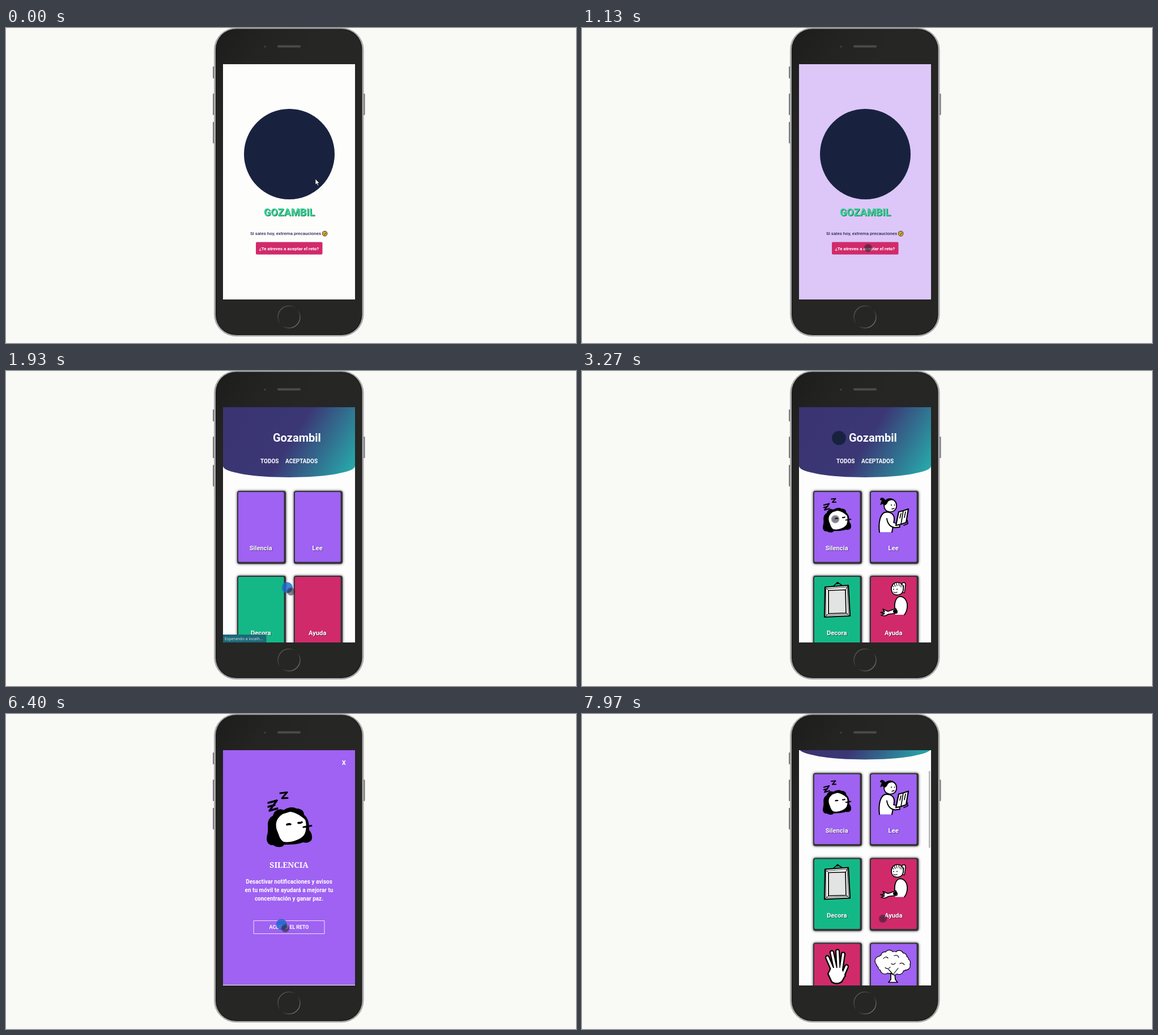
Recreate the animation shown at these times as an HTML page with a canvas. Size 1006 by 557 pixels, loop 8 s.

```html
<!DOCTYPE html>
<html lang="es">
<head>
<meta charset="utf-8">
<title>Gozambil</title>
<style>
html, body { margin: 0; width: 100%; height: 100%; overflow: hidden; background: #f9faf6; }
canvas { display: block; width: 1006px; height: 557px; }
</style>
</head>
<body>
<canvas id="stage"></canvas>
<script>
const W = 1006, H = 557, LOOP = 8000;
const canvas = document.getElementById('stage');
const ctx = canvas.getContext('2d');
const ratio = window.devicePixelRatio || 1;
canvas.width = W * ratio;
canvas.height = H * ratio;

const PURPLE = '#9f62f2', GREEN = '#14b886', PINK = '#d12a6b', NAVY = '#18223f';
const SCREEN = { x: 383, y: 64, w: 233, h: 416 };
const MID = 499.5;
const SCROLL = 107.5;

// Times in ms at which the pages and the cursor change
const T = {
  arrowEnd: 120, list: 1720, images: 2300, detail: 3800,
  idle: 4450, statusEnd: 4600, wait: 6400, back: 6630, drag: 7300, dragEnd: 7970
};

// Pointer stops: time, x, y
const STOPS = [
  [0, 546, 267], [830, 505, 389], [1700, 505, 389], [1930, 503, 390],
  [2530, 503, 390], [3270, 447, 262], [3850, 447, 262], [4330, 444, 331],
  [4570, 444, 331], [5130, 470, 360], [5530, 470, 360], [6100, 493, 379],
  [6630, 493, 379], [6970, 531, 469.5], [T.drag, 531, 469.5], [T.dragEnd, 531, 362]
];

const clamp = v => Math.max(0, Math.min(1, v));
const smooth = v => v * v * (3 - 2 * v);
const mix = (a, b, p) => a + (b - a) * p;
const span = (t, from, to) => smooth(clamp((t - from) / (to - from)));

function pointerAt(t) {
  let i = 0;
  while (i < STOPS.length - 2 && t >= STOPS[i + 1][0]) i++;
  const a = STOPS[i], b = STOPS[i + 1], p = span(t, a[0], b[0]);
  return { x: mix(a[1], b[1], p), y: mix(a[2], b[2], p) };
}

function box(x, y, w, h, r, fill) {
  ctx.beginPath();
  ctx.roundRect(x, y, w, h, r);
  ctx.fillStyle = fill;
  ctx.fill();
}

function disc(x, y, r, fill, ry = r) {
  ctx.beginPath();
  ctx.ellipse(x, y, r, ry, 0, 0, 7);
  ctx.fillStyle = fill;
  ctx.fill();
}

function shape(d, fill, line, width = 2) {
  const path = new Path2D(d);
  ctx.lineCap = ctx.lineJoin = 'round';
  if (fill) { ctx.fillStyle = fill; ctx.fill(path); }
  if (line) { ctx.strokeStyle = line; ctx.lineWidth = width; ctx.stroke(path); }
}

const ink = (d, width) => shape(d, null, '#000', width);

function label(str, x, y, size, opt = {}) {
  const { color = '#fff', align = 'center', weight = 700, family = 'Roboto, sans-serif', shadow } = opt;
  ctx.font = `${weight} ${size}px ${family}`;
  ctx.textAlign = align;
  if (shadow) {
    ctx.fillStyle = shadow;
    ctx.fillText(str, x + 1, y + 1);
  }
  ctx.fillStyle = color;
  ctx.fillText(str, x, y);
}

function phone() {
  [[365, 68, 21], [365, 116, 38], [365, 166, 38], [630, 116, 38]]
    .forEach(([x, y, h]) => box(x, y, 3.5, h, 1, '#77797a'));
  box(367, -0.5, 264.5, 546, 39, '#a9aaa9');
  box(370, 1.5, 258.5, 541.5, 36, '#1b1c1b');
  const body = ctx.createLinearGradient(371, 0, 500, 90);
  body.addColorStop(0, '#1c1c1b');
  body.addColorStop(0.5, '#232322');
  body.addColorStop(1, '#262625');
  box(371.5, 3, 255.5, 538.5, 35, body);
  box(479, 30.5, 41, 4, 2, '#4b4b4a');
  disc(457, 33, 2, '#3b3b3c');

  const ring = ctx.createLinearGradient(485, 497, 514, 525);
  ring.addColorStop(0, '#5a5a59');
  ring.addColorStop(0.45, '#252524');
  ring.addColorStop(0.55, '#252524');
  ring.addColorStop(1, '#70706f');
  ctx.beginPath();
  ctx.arc(MID, 511, 19.5, 0, 7);
  ctx.strokeStyle = ring;
  ctx.lineWidth = 1.5;
  ctx.stroke();
}

function wink(x, y) {
  disc(x, y, 4.8, '#33290f');
  disc(x, y, 3.9, '#e9b938');
  disc(x - 1.5, y - 1, 0.7, '#33290f');
  ink(`M${x + 0.7} ${y - 1}h1.6M${x - 1.7} ${y + 1.5}q2 1.3 3.4 -0.5`, 0.8);
}

function splash(t) {
  const p = clamp(0.35 * t / 1130);
  const tone = [[253, 159], [253, 98], [252, 242]].map(([a, b]) => Math.round(mix(a, b, p)));
  ctx.fillStyle = `rgb(${tone})`;
  ctx.fillRect(SCREEN.x, SCREEN.y, SCREEN.w, SCREEN.h);
  disc(500, 223, 80, NAVY);
  label('GOZAMBIL', 500, 332, 18, { color: '#3dd297', shadow: '#157a55' });
  label('Si sales hoy, extrema precauciones', 431, 366.3, 8, { color: '#2d2755', align: 'left', weight: 500 });
  wink(562.6, 363.6);
  box(441, 378.5, 117.5, 22, 2, PINK);
  label('¿Te atreves a aceptar el reto?', MID, 392.7, 8);
}

function sleeper() {
  shape('M471 180C474 168 484 167 490 170C498 164 508 164 512 167C522 167 526 172 526 178C535 186 535 196 535 205' +
    'C542 213 541 223 537 225C532 229 526 227 524 227C516 230 508 231 491 231C488 237 476 236 472 232' +
    'C462 233 458 224 461 214C463 206 462 202 462 196C462 188 466 182 471 180Z', '#000');
  shape('M478 205C474 190 480 183 488 177L501 173C508 173 520 179 528 187C531 195 530 208 526 214' +
    'C518 224 500 228 490 226C483 222 482 214 478 205Z', '#fff');
  ink('M496 195.5Q500 194 502 195M516 192.5Q519 193 522 191.5', 3.6);
  ink('M525 200L539 197.5M531 202L533 200', 3);
  ink('M463 157Q471 155 478 153L465 171L479 167M463 164L474 161', 3.4);
  ink('M484 140L496 138.5L487 149L497 148.5', 3);
}

function smallSleeper() {
  ctx.save();
  ctx.translate(425, 242);
  ctx.scale(0.625, 0.62);
  ctx.translate(-460, -165);
  sleeper();
  ctx.restore();
}

function reader() {
  shape('M525 285C523 268 526 254 534 250C544 248 552 253 551 263C550 272 548 279 547 285', '#fff', '#000', 2);
  shape('M538 261Q540 275 552 277L561 276L560 271L550 268', '#fff', '#000', 1.8);
  shape('M533 237C534 224 553 223 555 236C556 246 549 250 542 249C536 248 533 243 533 237Z', '#fff', '#000', 1.8);
  shape('M533 238C531 224 547 222 552 229Q544 227 540 231Q538 237 533 238Z', '#000');
  shape('M536 229C532 222 526 223 526 228L529 229L526 237L531 235L533 238Z', '#000');
  disc(546, 237, 1, '#000');
  disc(551.5, 237, 0.9, '#000');
  ink('M547 244L551 243', 1.3);
  shape('M559 249L567 247L576 244L572 268L563 271L554 273Z', '#fff', '#000', 2.2);
  ink('M567 247L563 271M571 249L569 259M563 252L561 260', 1.6);
  ink('M568 273L575 270L574 264', 1.8);
}

function painting() {
  ink('M444 380L451 374L459 379', 1.6);
  disc(451, 375, 2, '#000');
  shape('M429 382L470 379L473 433L428 435Z', '#fff', '#000', 2.2);
  ink('M431 385L468 382L470 430L431 432Z', 0.8);
  ink('M429 382L435 388M470 379L465 387M473 433L466 428M428 435L435 429', 1);
  shape('M435 388L465 387L466 428L435 429Z', '#e2e4e3', '#000', 1.7);
}

function helper() {
  shape('M553 431C550 415 552 403 560 399C570 398 575 408 574 418C573 426 570 430 568 431Z', '#fff');
  ink('M553 424C550 413 553 401 560 399C570 398 575 408 574 418Q573 426 569 431', 1.8);
  shape('M556 428L541 430L535 433L528 432L534 429L527 427L534 426L531 421L540 425L554 420Z', '#fff', '#000', 1.6);
  disc(553, 425, 4, '#000', 3.2);
  shape('M564 376Q571 371 571 379L569 392Q565 393 566 385Z', '#fff', '#000', 1.5);
  shape('M546 385C546 371 565 370 567 382C568 392 563 396 556 396C549 396 546 391 546 385Z', '#fff', '#000', 1.6);
  ink('M548 379L550 382M551 376L553 381M555 375L556 380M559 375L560 380M563 377L563 382M568 379L567 388', 1.1);
  disc(550, 386, 0.9, '#000');
  disc(556, 386, 0.9, '#000');
  ink('M550 391Q553 393 556 391', 1.2);
}

function hand() {
  const fingers = 'M446 568L433 538M449 566L441 529M453 566L451 527M456 567L461 532M457 577L467 554';
  const palm = 'M441 557L457 557L463 570L457 580Q449 585 442 580L436 567Z';
  ink(fingers, 8.5);
  shape(palm, '#000', '#000', 6);
  shape(fingers, null, '#fff', 3.8);
  shape(palm, '#fff', '#fff', 1);
}

function tree() {
  shape('M545 567L545 577L541 582H557L553 577L552 567L558 562H538Z', '#fff', '#000', 1.7);
  const crown = [];
  for (let i = 0; i < 17; i++) {
    const a = i * Math.PI * 2 / 17;
    crown.push([549 + 24 * Math.cos(a), 547 + 15 * Math.sin(a), 6 + 1.8 * Math.sin(i * 2.3)]);
  }
  crown.forEach(([x, y, r]) => disc(x, y, r + 1.2, '#000'));
  crown.forEach(([x, y, r]) => disc(x, y, r, '#fff'));
  disc(549, 547, 23, '#fff', 14.5);
  ink('M532 540q4 -5 8 -1M551 535q6 -3 8 3M561 549q5 -3 8 2M535 556q5 4 9 -1M549 568L541 559M550 567L558 557M546 549q4 3 7 -1', 1.2);
}

const CARDS = [
  ['Silencia', PURPLE, smallSleeper], ['Lee', PURPLE, reader],
  ['Decora', GREEN, painting], ['Ayuda', PINK, helper],
  ['', PINK, hand], ['', PURPLE, tree]
];

function card([name, color, draw], i, images) {
  const x = 410 + (i % 2) * 100, y = 214 + Math.floor(i / 2) * 150;
  ctx.save();
  ctx.shadowColor = '#2b2b2e';
  ctx.shadowBlur = 4 * ratio;
  box(x - 2, y - 2, 86, 129, 4, '#343437');
  ctx.restore();
  box(x, y, 80.5, 123.5, 2, color);
  if (images) draw();
  if (name) label(name, x + 39.7, y + 103, 11.2, { shadow: 'rgba(30,20,40,.55)' });
}

function header(images) {
  const g = ctx.createLinearGradient(425, 55, 615, 170);
  g.addColorStop(0, '#3a3472');
  g.addColorStop(0.46, '#3b3775');
  g.addColorStop(1, '#27a9aa');
  ctx.beginPath();
  ctx.rect(SCREEN.x, SCREEN.y, SCREEN.w, 104);
  ctx.ellipse(MID, 168, 116.5, 20, 0, 0, Math.PI);
  ctx.fillStyle = g;
  ctx.fill();
  if (images) disc(453.5, 118.5, 12.5, NAVY);
  label('Gozambil', 471, 125.3, 20, { align: 'left' });
  label('TODOS', 449, 162.5, 10, { align: 'left' });
  label('ACEPTADOS', 493, 162.5, 10, { align: 'left' });
}

function list(t) {
  const images = t >= T.images;
  const top = SCROLL * span(t, T.drag, T.dragEnd);
  ctx.fillStyle = '#fdfdfd';
  ctx.fillRect(SCREEN.x, SCREEN.y, SCREEN.w, SCREEN.h);
  ctx.save();
  ctx.translate(0, -top);
  header(images);
  CARDS.forEach((c, i) => card(c, i, images));
  ctx.restore();
  if (t >= T.drag) box(612, 65 + top / 3, 2.5, 136, 1, '#b4b4b6');
}

function detail() {
  ctx.fillStyle = '#fdfdfd';
  ctx.fillRect(SCREEN.x, SCREEN.y, SCREEN.w, SCREEN.h);
  ctx.fillStyle = PURPLE;
  ctx.fillRect(SCREEN.x, SCREEN.y, SCREEN.w, SCREEN.h - 1);
  label('X', 596.3, 90, 11.2);
  sleeper();
  label('SILENCIA', MID, 271.5, 14, { family: '"Roboto Slab", "Noto Serif", serif' });
  ['Desactivar notificaciones y avisos', 'en tu móvil te ayudará a mejorar tu', 'concentración y ganar paz.']
    .forEach((line, i) => label(line, MID, 300 + i * 15.2, 10));
  ctx.strokeStyle = '#efe4fd';
  ctx.lineWidth = 1;
  ctx.strokeRect(437.5, 365.5, 124.5, 23);
  label('ACEPTO EL RETO', MID, 380.2, 8.8);
}

function status(str) {
  box(383, 466, 76.5, 14, [0, 2, 0, 0], '#1d6a78');
  label(str, 386, 475.7, 7, { color: '#d5e8ea', align: 'left', weight: 400, family: '"Open Sans", sans-serif' });
}

function pointer(t) {
  const { x, y } = pointerAt(t);
  if (t < T.arrowEnd) {
    shape(`M${x} ${y}v10l2.4 -2l1.8 3.8l1.6 -.8l-1.8 -3.6h3Z`, '#fff', '#222', 0.8);
    return;
  }
  const busy = (t >= T.list && t < T.images) || (t >= T.detail && t < T.idle) || (t >= T.wait && t < T.back);
  if (busy) disc(x - 6.7, y - 7, 9.7, 'rgba(28,104,204,.82)');
  const glow = ctx.createRadialGradient(x, y, 0, x, y, 7.5);
  glow.addColorStop(0, 'rgba(35,30,45,.62)');
  glow.addColorStop(0.75, 'rgba(35,30,45,.55)');
  glow.addColorStop(1, 'rgba(35,30,45,.25)');
  disc(x, y, 7.5, glow);
}

function draw(t) {
  ctx.setTransform(ratio, 0, 0, ratio, 0, 0);
  ctx.fillStyle = '#f9faf6';
  ctx.fillRect(0, 0, W, H);
  phone();
  ctx.save();
  ctx.beginPath();
  ctx.rect(SCREEN.x, SCREEN.y, SCREEN.w, SCREEN.h);
  ctx.clip();
  if (t < T.list) splash(t);
  else if (t >= T.detail && t < T.back) detail();
  else list(t);
  if (t >= T.list && t < T.images) status('Esperando a localh...');
  if (t >= T.detail && t < T.statusEnd) status('Esperando a coco...');
  pointer(t);
  ctx.restore();
}

const start = performance.now();
function tick() {
  draw((performance.now() - start) % LOOP);
  requestAnimationFrame(tick);
}
tick();
</script>
</body>
</html>
```
